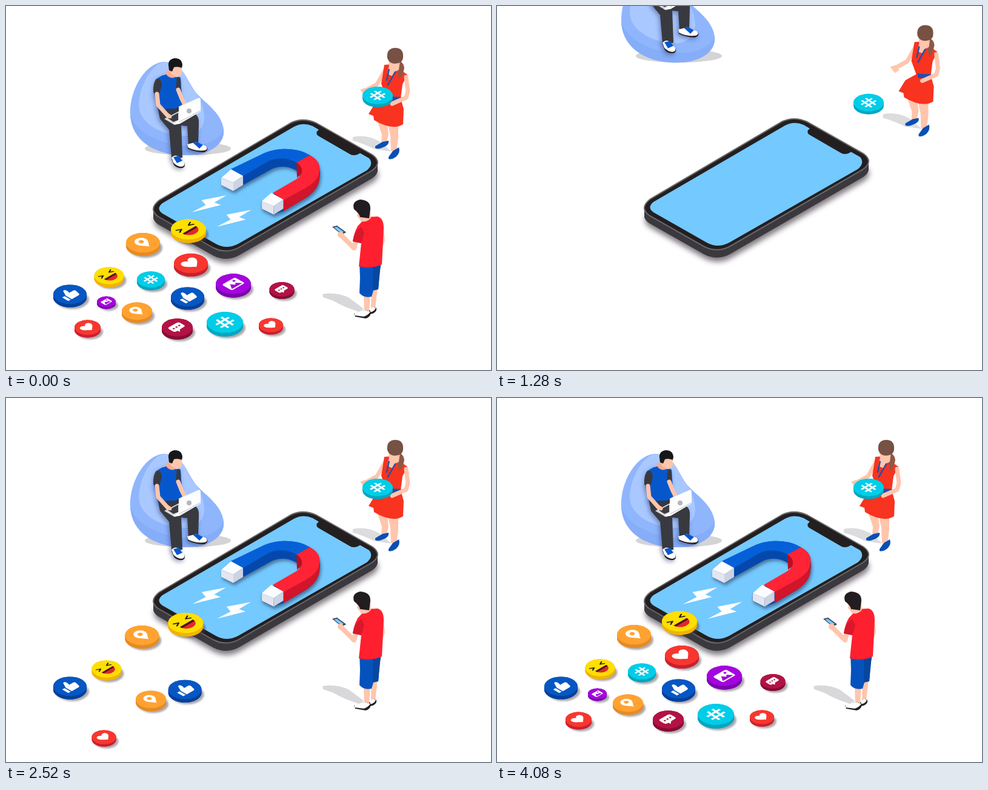
These frames come from a looping animation (800x600 px, 4120 ms). An HTML page with a canvas:

```html
<!DOCTYPE html>
<html lang="en">
<head>
<meta charset="utf-8">
<title>Magnet marketing</title>
<style>
html, body { margin: 0; width: 100%; height: 100%; overflow: hidden; background: #fff; }
canvas { display: block; width: 800px; height: 600px; }
</style>
</head>
<body>
<canvas id="stage" width="800" height="600"></canvas>
<script>
const ctx = document.getElementById('stage').getContext('2d');
const LOOP = 4120, STEP = 40;
const SKIN = '#ffc5ad', SKIN_DARK = '#f4ad94', INK = '#231f20';

const cache = new Map();
function path(d) {
  if (!cache.has(d)) cache.set(d, new Path2D(d));
  return cache.get(d);
}
function fill(d, color) {
  ctx.fillStyle = color;
  ctx.fill(path(d));
}
function line(d, color, width, cap = 'round') {
  ctx.strokeStyle = color;
  ctx.lineWidth = width;
  ctx.lineCap = cap;
  ctx.lineJoin = 'round';
  ctx.stroke(path(d));
}
function oval(x, y, rx, ry, color, turn = 0) {
  ctx.fillStyle = color;
  ctx.beginPath();
  ctx.ellipse(x, y, rx, ry, turn, 0, 7);
  ctx.fill();
}
function at(x, y, draw) {
  ctx.save();
  ctx.translate(x, y);
  draw();
  ctx.restore();
}
function shade(color, blur, x, y) {
  ctx.shadowColor = color;
  ctx.shadowBlur = blur;
  ctx.shadowOffsetX = x;
  ctx.shadowOffsetY = y;
}
function noShade() { ctx.shadowColor = 'transparent'; }

// Remaining distance of a damped spring: 1 at the start, 0 at rest.
function spring(ms) {
  const a = Math.max(0, ms) * 0.0132;
  return Math.exp(-0.649 * a) * (Math.cos(a) + 0.649 * Math.sin(a));
}

// ---- coins: icons live on a unit circle lying on the isometric floor ----
const icons = {
  like() {
    fill('M-.56,-.1h.2v.52h-.2z', '#fff');
    fill('M-.28,-.08L-.04,-.54Q.16,-.6 .13,-.32L.08,-.14H.42Q.54,-.12 .5,.04L.42,.36Q.38,.44 .28,.44H-.28Z', '#fff');
  },
  laugh() {
    line('M-.56,-.42l.28,.14l-.28,.14M.56,-.42l-.28,.14l.28,.14', INK, 0.09);
    fill('M-.52,.06H.52C.52,.74 -.52,.74 -.52,.06Z', '#e3262d');
    fill('M-.52,.06H.52Q.53,.14 .5,.22H-.5Q-.53,.14 -.52,.06Z', '#4a1512');
  },
  pin() {
    fill('M0,.56C-.1,.3 -.4,.14 -.4,-.15A.4,.4 0 0 1 .4,-.15C.4,.14 .1,.3 0,.56Z', '#fff');
    oval(0, -0.15, 0.16, 0.16, '#ffa231');
  },
  heart() {
    fill('M0,.48C-.3,.22 -.54,.06 -.54,-.18C-.54,-.5 -.12,-.54 0,-.24C.12,-.54 .54,-.5 .54,-.18C.54,.06 .3,.22 0,.48Z', '#fff');
  },
  photo() {
    fill('M-.4,-.4H.4Q.52,-.4 .52,-.28V.28Q.52,.4 .4,.4H-.4Q-.52,.4 -.52,.28V-.28Q-.52,-.4 -.4,-.4Z', '#fff');
    fill('M-.42,.3L-.16,-.1L.03,.14L.16,0L.42,.3Z', '#a000dc');
    oval(0.24, -0.19, 0.09, 0.09, '#a000dc');
  },
  chat() {
    fill('M-.34,-.4H.34Q.5,-.4 .5,-.24V.1Q.5,.26 .34,.26H0L-.24,.46V.26H-.34Q-.5,.26 -.5,.1V-.24Q-.5,-.4 -.34,-.4Z', '#fff');
    for (const x of [-0.25, 0, 0.25]) oval(x, -0.07, 0.075, 0.075, '#b0103f');
  },
  hash() {
    line('M-.14,-.5L-.22,.5M.22,-.5L.14,.5M-.5,-.18H.5M-.5,.18H.5', '#fff', 0.14, 'butt');
  }
};
const paint = {
  like: ['#0657c4', '#03419c'], laugh: ['#ffdf00', '#f2b300'],
  pin: ['#ffa231', '#e58b22'], heart: ['#f7372f', '#c9202f'],
  photo: ['#a404dd', '#7b03ad'], chat: ['#b31245', '#870c34'],
  hash: ['#00cde8', '#00a6bf']
};
function coin(kind, x, y, r, shadow = true) {
  const h = r * 0.2, ry = r * 0.577, [top, side] = paint[kind];
  if (shadow) {
    shade('rgba(70,60,70,.45)', 3, 4, 3);
    oval(x, y + h / 2, r, ry, side);
    noShade();
  }
  ctx.fillStyle = side;
  ctx.beginPath();
  ctx.ellipse(x, y + h / 2, r, ry, 0, 0, Math.PI);
  ctx.ellipse(x, y - h / 2, r, ry, 0, Math.PI, 2 * Math.PI);
  ctx.fill();
  oval(x, y - h / 2, r, ry, top);
  ctx.save();
  ctx.transform(0.707 * r, -0.408 * r, 0.707 * r, 0.408 * r, x, y - h / 2);
  icons[kind]();
  ctx.restore();
}

// kind, rest x, rest y, radius, start time, height where it enters
const EDGE = -80;
const coins = [
  ['like', 105.5, 478, 27.5, 1459, 570],
  ['like', 299.5, 482, 27.5, 1982, 591],
  ['laugh', 301, 371, 29, 1987, 589],
  ['laugh', 170, 447, 24.5, 2059, 572],
  ['pin', 226, 393, 28, 2107, 567],
  ['pin', 216, 505.5, 25, 2210, 585],
  ['heart', 437, 528, 20, 2440, 590],
  ['heart', 134.5, 532, 21.5, 2480, 590],
  ['heart', 305, 427, 28, 2530, 590],
  ['photo', 375, 461, 29, 2731, 596],
  ['photo', 165.5, 489, 15.5, 2790, 580],
  ['chat', 282.5, 532.5, 25.5, 2840, 603],
  ['chat', 455, 469, 20.5, 2882, 595],
  ['hash', 361, 524.5, 30, 3004, 592],
  ['hash', 239, 453, 23, 3190, 593]
];

// ---- scene pieces, drawn at their rest places ----
function phone() {
  const face = 'M470,192.5Q490,183 512,193L604,245Q622,258 604,271L386,397Q364,410 341,398L251,347Q234,335 253,320Z';
  ctx.save();
  ctx.translate(0, 13);
  shade('rgba(50,40,50,.6)', 8, 1, 7);
  fill(face, '#3b393e');
  noShade();
  for (let i = 0; i < 13; i++) {
    ctx.translate(0, -1);
    fill(face, '#3b393e');
  }
  ctx.restore();
  fill(face, INK);
  line(face, '#69686c', 2);
  fill('M475,199Q490,191 506,198L516,204Q509,209 515,214L566,243.5Q574,249 584,242.5L599,251Q607,261 595,271L383,392Q364,402 346,392L258,342Q247,334 258,325Z', '#74c9ff');
}

function magnet() {
  shade('rgba(30,40,70,.5)', 5, 2, 4);
  fill('M355,283L371,269L425,243C450,232 482,234 501,246C516,254 520,270 517,286C515,300 505,310 492,318L458,338L440,344L421,334L421,322L478,288C488,282 487,276 478,270C464,262 450,264 438,269L391,295L375,305L355,295Z', '#0a4aa8');
  noShade();
  fill('M391,280L434,255C448,249 466,250 479,258L480,272C466,263 449,263 437,269L391,295Z', '#0548ac');
  fill('M371,269L425,243C450,232 482,234 501,246L479,258C466,250 448,249 434,255L391,280Z', '#0560d8');
  fill('M479,258L489,266Q492,275 480,283Z', '#b80f22');
  fill('M458,320L496,298C512,288 518,278 518,264L517,286C515,300 505,310 492,318L458,338Z', '#d1152a');
  fill('M501,246C515,253 519,262 517,272C515,286 506,293 494,300L458,320L440,308L478,286C491,278 492,266 479,258Z', '#ff2435');
  for (const [x, y] of [[0, 0], [66.5, 39]]) {
    at(x, y, () => {
      fill('M355,283L375,291L375,305L355,295Z', '#e3e6f0');
      fill('M375,291L391,280L391,295L375,305Z', '#ced3e2');
      fill('M355,283L371,269L391,280L375,291Z', '#fbfcff');
    });
  }
}

function bolt(x, y, size) {
  at(x, y, () => {
    ctx.scale(size, size);
    fill('M29,-14L-12,-6L-5,2L-28,14L20,2L9,-2Z', '#fff');
  });
}

function bag() {
  oval(300, 235, 71, 11, '#d4d4d6');
  fill('M262,92C232,92 204,135 205,178C206,215 235,238 272,244C320,252 362,236 359,203C356,178 330,160 318,148C298,128 296,94 262,92Z', '#8fb5fd');
  fill('M262,92C240,94 221,132 219,160C217,192 254,212 292,214C312,215 326,204 327,184C326,165 320,152 312,142C297,124 294,94 262,92Z', '#a9c8ff');
  fill('M205,178C209,202 246,226 290,230C326,232 352,222 359,203C362,236 320,252 272,244C235,238 206,215 205,178Z', '#86adf8');
}

function sitter() {
  const dark = '#393a3f';
  shade('rgba(35,50,110,.45)', 7, -2, 3);
  fill('M250,166L278,164L312,178Q319,183 318,194L317,230L301,230L299,198L289,197L291,250L273,250L269,204L254,186Z', dark);
  fill('M273,252Q272,246 281,247L294,258Q297,265 291,267Q282,268 277,262Z', INK);
  fill('M299,230Q303,223 315,225L331,232Q335,238 327,241Q312,241 300,235Z', INK);
  fill('M247,122Q257,111 275,112L288,118L291,162L280,169L251,170L244,143Z', '#0757cc');
  noShade();
  fill('M273,250Q278,244 285,248L294,258Q296,264 289,265Q281,264 276,258Z', '#fff');
  fill('M276,249L285,247L291,255L282,259Z', '#0757cc');
  fill('M299,228L314,224L330,231Q334,236 328,238Q312,240 300,233Z', '#fff');
  fill('M308,225L315,224L325,229L319,235Z', '#0757cc');
  fill('M282,116L288,121L288,137L280,136Z', dark);
  line('M284,138L290,153L294,161', SKIN, 7);
  fill('M248,120Q256,118 257,130L253,145L243,143Q242,127 248,120Z', dark);
  line('M249,145L251,163L267,181', SKIN, 7);
  fill('M262,108L271,105L283,113Q276,123 266,115Z', SKIN_DARK);
  fill('M271,96Q287,93 290,101L290,111Q287,118 280,117L272,112Z', SKIN);
  fill('M268,98Q267,88 278,86Q290,86 291,97L290,102Q283,99 277,101L274,108L269,106Z', '#17171a');
  fill('M261,186L286,173L287,194L278,196Z', '#d9dade');
  fill('M267,185L284,176L284,188L276,191Z', '#3c3d43');
  fill('M285,166L319,151Q321,152 321,155L321,174L287,194L275,195L285,188Z', '#fdfdfe');
  line('M286,191L320,173', '#d5d6db', 1.5);
  oval(302, 173, 4, 4, '#b5b6bb');
  oval(268, 181, 6, 3.5, SKIN, 0.5);
}

function woman() {
  fill('M572,216Q594,211 616,223L636,240L608,236Q588,226 572,222Z', '#dcdcde');
  fill('M612,188L628,188L631,211L627,229L619,227L620,212Z', SKIN);
  fill('M629,190L647,192L647,218L644,240L635,239L634,214Z', SKIN);
  fill('M609,231L621,224L631,222Q633,229 622,233Q613,237 609,234Z', '#0a4fb4');
  fill('M631,249L638,239L648,233Q651,241 644,248Q636,254 631,252Z', '#0a4fb4');
  line('M627,103L612,129L592,140', SKIN, 7);
  fill('M584,138L592,135L599,143L592,148Z', SKIN);
  fill('M624,97L636,96L650,105L662,113L654,129L651,152L656,170L655,195Q637,206 607,188L606,181L598,178L609,160L627,150L619,128Z', '#f8331f');
  fill('M631,101L645,105L638,116L629,112Z', SKIN);
  line('M644,105L630,130M632,104L628,122', '#2050a8', 2.5);
  fill('M629,149L652,150L651,157L630,156Z', '#204fae');
  line('M660,117L663,140L660,151L637,161', SKIN, 7);
  fill('M644,89Q656,91 657,102Q655,115 648,121Q648,107 640,98Z', '#8e5846');
  fill('M631,89L650,89L648,105Q639,112 632,104Z', SKIN);
  fill('M629,86Q627,69 643,69Q656,70 655,84Q655,94 642,95Q632,95 629,86Z', '#765144');
}

function stander() {
  fill('M522,475Q545,471 566,481L590,499L582,504Q559,497 540,486L523,480Z', '#d8d8da');
  fill('M590,474L601,474L599,505L591,505Z', SKIN);
  fill('M603,464L613,464L609,499L602,498Z', SKIN);
  fill('M599,502L606,495L611,498Q612,504 605,507L599,508Z', INK);
  fill('M600,500L606,495L610,498Q608,503 601,505Z', '#fff');
  fill('M574,507Q586,502 591,501L602,504Q602,513 593,515L576,512Z', INK);
  fill('M575,506Q586,502 591,501L601,504Q597,510 590,512L575,510Z', '#fff');
  line('M619,370L621,386L616,400', SKIN, 8);
  fill('M583,422L619,421L616,442L614,467L606,469L603,479Q590,482 583,473L584,448Z', '#0552bd');
  fill('M605,430L618,425L614,467L605,468Z', '#07479f');
  line('M577,388L574,399L552,377', SKIN, 8);
  fill('M538,364L546,362L561,373L554,377Z', '#34425e');
  fill('M541,365L546,364L557,372L553,375Z', '#79c9f5');
  oval(552, 377, 5, 5, SKIN, 0.6);
  fill('M594,348L613,347Q623,350 623,366L620,426Q603,434 582,429L586,391L572,388Q574,374 580,363Z', '#ff202f');
  fill('M586,364L591,375L586,391L572,388Q574,371 586,364Z', '#d9182b');
  fill('M580,338L601,339L602,349Q596,357 586,355L579,346Z', SKIN);
  fill('M574,335Q570,322 584,319Q602,320 601,335L599,350L584,348Q583,342 574,335Z', '#221d20');
}

// start time, offset of entry, drawing
const pieces = [
  [888, 0, 420, phone],
  [1204, 0, -270, bag],
  [1219, 0, -275, sitter],
  [1166, 240, -140, woman],
  [962, 0, -170, () => coin('hash', 613, 150, 25, false)],
  [1430, 280, 170, stander],
  [1484, 0, -346, magnet]
];

function scene(t) {
  for (const [start, dx, dy, draw] of pieces) {
    if (t < start) continue;
    const r = spring(t - start);
    at(dx * r, dy * r, draw);
  }
  if (t > 2033) bolt(334.5, 326, 1 - spring(t - 2033));
  if (t > 2050) bolt(375.5, 350, 1 - spring(t - 2050));
  for (const [kind, x, y, r, start, enter] of coins) {
    if (t < start) continue;
    const k = spring(t - start);
    coin(kind, x + (EDGE - x) * k, y + (enter - y) * k, r);
  }
}

function frame(now) {
  const t = Math.floor(now % LOOP / STEP) * STEP;
  ctx.fillStyle = '#fff';
  ctx.fillRect(0, 0, 800, 600);
  if (t < 240) scene(t + LOOP);
  else if (t >= 840) scene(t);
  requestAnimationFrame(frame);
}
frame(performance.now());
</script>
</body>
</html>
```
